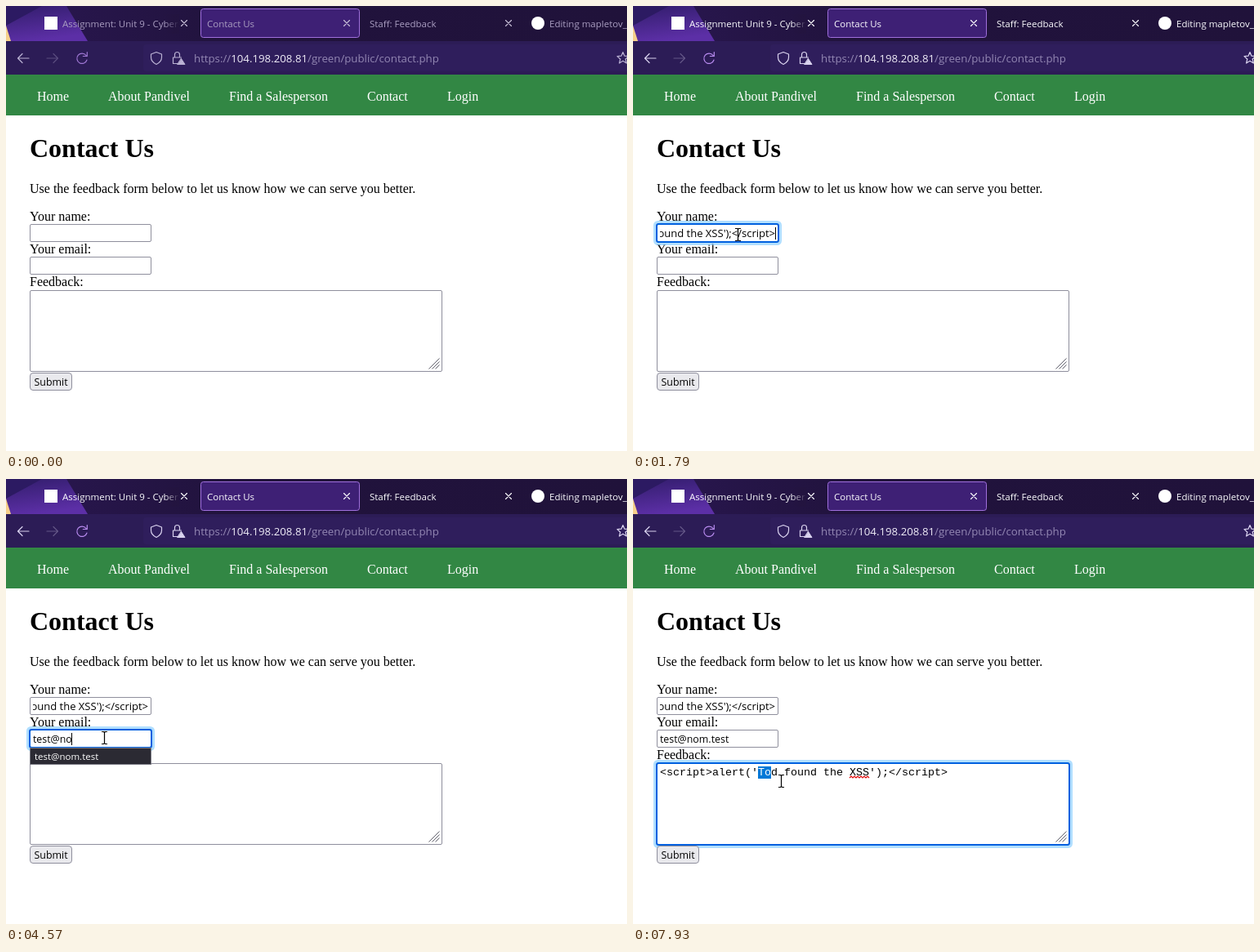
Write an HTML page that moves like this. It is 760 px wide and 545 px high and loops after 8000 ms.

```html
<!DOCTYPE html>
<html lang="en">
<head>
<meta charset="utf-8">
<title>Contact form</title>
<style>
  html, body { margin: 0; width: 100%; height: 100%; overflow: hidden; background: #fff; }
  svg { display: block; width: 760px; height: 545px; }
  text { white-space: pre; }
  .ui { font: 11.5px "Open Sans", "Noto Sans", sans-serif; }
  .url { font: 13.25px "Open Sans", "Noto Sans", sans-serif; }
  .field { font: 12.4px "Open Sans", "Noto Sans", sans-serif; }
  .markup { font-size: 13px; }
  .page { font: 16px "Liberation Serif", "Times New Roman", serif; }
  .title { font: bold 32px "Liberation Serif", "Times New Roman", serif; }
  .code { font: 13.333px "Liberation Mono", "Courier New", monospace; }
  .line { fill: none; stroke-linecap: round; stroke-linejoin: round; }
</style>
</head>
<body>
<svg id="stage" viewBox="0 0 760 545" xmlns="http://www.w3.org/2000/svg">
  <defs>
    <linearGradient id="strip">
      <stop offset="0" stop-color="#2a1752"/><stop offset=".35" stop-color="#21133d"/><stop offset="1" stop-color="#20123a"/>
    </linearGradient>
    <linearGradient id="art" x1="0" y1="0" x2=".3" y2="1">
      <stop offset="0" stop-color="#321d6c"/><stop offset="1" stop-color="#5c2fa6"/>
    </linearGradient>
    <linearGradient id="fade">
      <stop offset="0" stop-color="#23143f" stop-opacity="0"/><stop offset="1" stop-color="#23143f"/>
    </linearGradient>
    <clipPath id="tabClip"><rect x="40" y="0" width="171" height="43"/></clipPath>
    <clipPath id="nameClip"><rect x="33" y="268" width="142" height="20"/></clipPath>
  </defs>

  <rect width="760" height="545" fill="#fff"/>

  <!-- tab strip -->
  <rect width="760" height="43" fill="url(#strip)"/>
  <path d="M0 0H74L100 43H0Z" fill="url(#art)"/>
  <path d="M0 0H44L0 24Z" fill="#2c1a62"/>
  <path d="M0 24L6 43H0Z" fill="#f6cf8a"/>
  <rect x="238.5" y="3.5" width="194" height="35" rx="3" fill="#3e2075" stroke="#a070dd"/>
  <rect x="47" y="13" width="16" height="16" fill="#fff"/>
  <circle cx="651" cy="21" r="8" fill="#fff"/>
  <g id="tabs" class="ui">
    <text x="69" y="26" clip-path="url(#tabClip)">Assignment: Unit 9 - Cyber</text>
    <text x="246" y="26">Contact Us</text>
    <text x="445" y="26">Staff: Feedback</text>
    <text x="665" y="26">Editing mapletov_</text>
  </g>
  <rect x="194" y="10" width="18" height="24" fill="url(#fade)"/>
  <path id="closers" class="line" stroke-width="1.1"
    d="M214.500 17.500l7 7m0-7l-7 7M413.500 17.500l7 7m0-7l-7 7M611.500 17.500l7 7m0-7l-7 7"/>

  <!-- toolbar -->
  <rect y="43" width="760" height="41" fill="#2c1c56"/>
  <rect x="168" y="47" width="600" height="33" rx="4" fill="#2f1e5c"/>
  <g id="tools" class="line" stroke="#d9d2ee" stroke-width="1.2">
    <path d="M28 64H15M20 58.500L14.500 64L20 69.500"/>
    <path d="M50 64H63M58 58.500L63.500 64L58 69.500" opacity=".32"/>
    <path d="M98 60.500A6.200 6.200 0 1 0 99 66M99.300 56.500V61.500H94.300" stroke="#b98cf0"/>
    <path d="M184 56.500L190.500 59V63C190.500 67 188 69.500 184 71.500C180 69.500 177.500 67 177.500 63V59Z"/>
    <path d="M210 70.500H204.500V63H214.500M206.500 63V59.500A3 3 0 0 1 212.500 59.500V63"/>
    <path d="M214.500 64.500L219 71.500H210Z" fill="#d9d2ee" stroke-width="1"/>
    <path d="M755 56.500L757 61.200L762 61.600L758.200 65L759.400 70L755 67.300L750.600 70L751.800 65L748 61.600L753 61.200Z"/>
  </g>
  <text class="url" x="230" y="69" fill="#9387b3">https://<tspan fill="#f0edf8">104.198.208.81</tspan>/green/public/contact.php</text>

  <!-- page -->
  <rect y="84" width="760" height="50" fill="#328744"/>
  <g class="page" fill="#fff">
    <text x="38" y="116">Home</text>
    <text x="125" y="116">About Pandivel</text>
    <text x="273" y="116">Find a Salesperson</text>
    <text x="442" y="116">Contact</text>
    <text x="540" y="116">Login</text>
  </g>
  <text class="title" x="29" y="185">Contact Us</text>
  <g class="page">
    <text x="29" y="229">Use the feedback form below to let us know how we can serve you better.</text>
    <text x="29" y="263">Your name:</text>
    <text x="29" y="303">Your email:</text>
    <text x="29" y="343">Feedback:</text>
  </g>
  <g id="fields"></g>
  <path d="M517.500 444.500L530.500 431.500M521.500 444.500L530.500 435.500M525.500 444.500L530.500 439.500" stroke="#5f5f6b" fill="none"/>
  <rect x="29.500" y="449.500" width="51" height="21" rx="3.500" fill="#e9e9ed" stroke="#8f8f9d"/>
  <text class="field" x="34.500" y="465">Submit</text>

  <g clip-path="url(#nameClip)"><text id="nameText" class="field markup" x="174" y="283" text-anchor="end"></text></g>
  <text id="emailText" class="field" x="33" y="323"></text>
  <text id="codeText" class="code" x="33" y="363"></text>
  <path id="squiggle" fill="none" stroke="#e00000" stroke-width="1.2"/>
  <rect id="selection" x="153" y="352" height="15" fill="#0078d7"/>
  <text id="selectedText" class="code" x="153" y="363" fill="#fff"></text>
  <rect id="caret" width="1" height="15"/>

  <g id="popups"></g>

  <circle id="click" r="12" fill="#ffe02e" opacity=".85"/>
  <g id="cursor">
    <g id="beam" fill="none">
      <path d="M-3.500 -7.500H-1L0 -6.500L1 -7.500H3.500M0 -6.500V6.500M-3.500 7.500H-1L0 6.500L1 7.500H3.500" stroke="#000" stroke-width="1.200"/>
    </g>
    <path id="arrow" d="M0 0V16.500L3.800 13L6.300 18.800L8.700 17.800L6.200 12.200H11.500Z" fill="#fff" stroke="#000"/>
  </g>
</svg>

<script>
const LOOP = 8000;
const PAYLOAD = "<script>alert('Tod found the XSS');<\/script>";
const EMAIL = "test@nom.test";
const KEY_TIMES = [2780, 2840, 2970, 3240, 4170, 4430, 4570, 4760, 4890, 5020, 5160, 5220, 5290];

// time, x, y of the pointer
const POINTER = [
  [190, 690, 530], [320, 500, 425], [450, 320, 340], [590, 172, 288], [720, 128, 280],
  [1920, 128, 280], [2050, 125, 300], [2180, 120, 317], [6610, 120, 317], [6740, 126, 325],
  [6880, 144, 348], [7010, 157, 367], [7070, 157, 367], [7400, 158, 376], [7470, 158, 393],
  [7600, 159, 372], [7730, 159, 355], [7860, 169, 362], [7930, 181, 370]
];
const FIELDS = {
  name: { x: 29, y: 267, w: 149, h: 22 },
  email: { x: 29, y: 307, w: 149, h: 22 },
  feedback: { x: 29, y: 348, w: 505, h: 100 }
};

const $ = id => document.getElementById(id);
const set = (node, attrs) => { for (const k in attrs) node.setAttribute(k, attrs[k]); };
const show = (node, on) => { node.style.display = on ? "" : "none"; };
const within = (t, from, to) => t >= from && t < to;

function add(parent, tag, attrs, text) {
  const node = document.createElementNS("http://www.w3.org/2000/svg", tag);
  set(node, attrs);
  if (text) node.textContent = text;
  return parent.appendChild(node);
}

for (const f of Object.values(FIELDS)) {
  f.box = add($("fields"), "rect", { x: f.x + .5, y: f.y + .5, width: f.w - 1, height: f.h - 1, rx: 1.5, fill: "#fff" });
}
for (const f of Object.values(FIELDS)) {
  f.ring = add($("fields"), "g", { fill: "none" });
  add(f.ring, "rect", { x: f.x - 2.5, y: f.y - 2.5, width: f.w + 5, height: f.h + 5, rx: 4, stroke: "#8fd0ff", "stroke-width": 3, opacity: .7 });
  add(f.ring, "rect", { x: f.x, y: f.y, width: f.w, height: f.h, rx: 2, stroke: "#0060df", "stroke-width": 2 });
}

function makePopup(y, rows) {
  const group = add($("popups"), "g", { class: "ui", fill: "#fff" });
  add(group, "rect", { x: 29.5, y: y + .5, width: 148, height: rows.length * 20, fill: "#2b2a33", stroke: "#7c7c85" });
  rows.forEach((row, i) => add(group, "text", { x: 35, y: y + 15 + i * 20 }, row));
  return group;
}
const shortPayload = PAYLOAD.slice(0, 23) + "...";
const namePopup = makePopup(289, ["' OR 1=1 --'", shortPayload, "\" OR 1=1 #", "\" OR 1=1 ;--", shortPayload]);
const emailPopup = makePopup(329, ["test@wum.test", EMAIL]);
const matchPopup = makePopup(329, [EMAIL]);

let wave = "M265 366";
for (let i = 0; i < 12; i++) wave += `l2 ${i % 2 ? 2 : -2}`;
set($("squiggle"), { d: wave });

function pointerAt(t) {
  const i = POINTER.findIndex(p => p[0] > t);
  if (i < 0) return POINTER[POINTER.length - 1].slice(1);
  if (i === 0) return POINTER[0].slice(1);
  const [t0, x0, y0] = POINTER[i - 1], [t1, x1, y1] = POINTER[i];
  const k = (t - t0) / (t1 - t0);
  return [x0 + (x1 - x0) * k, y0 + (y1 - y0) * k];
}

const inside = (f, x, y) => x >= f.x && x <= f.x + f.w && y >= f.y && y <= f.y + f.h;

function focusedField(t) {
  if (t < 1060) return null;
  if (t < 2180) return "name";
  return t < 5550 ? "email" : "feedback";
}

function drawCaret(t, focus) {
  let x = 33, y = 271, on = t >= 1060;
  if (focus === "name") {
    if (t >= 1650) x = 174;
  } else if (focus === "email") {
    x = 33 + Math.floor($("emailText").getComputedTextLength());
    y = 311;
    on = !within(t, 3310, 3900) && t < 5490;
  } else if (focus === "feedback") {
    x = t < 6280 ? 33 : t < 7400 ? 385 : 153;
    y = 352;
    on = !within(t, 6080, 6280) && !within(t, 6840, 7370) && t < 7800;
  }
  set($("caret"), { x, y });
  show($("caret"), on);
}

function render(t) {
  const active = t >= 1060;
  set($("tabs"), { fill: active ? "#fbfbfe" : "#a99dc0" });
  set($("closers"), { stroke: active ? "#fbfbfe" : "#c9c0d8" });
  set($("tools"), { opacity: active ? 1 : .82 });

  const [x, y] = pointerAt(t);
  const focus = focusedField(t);
  for (const [key, f] of Object.entries(FIELDS)) {
    show(f.ring, key === focus);
    set(f.box, { stroke: t >= 190 && inside(f, x, y) ? "#676774" : "#8f8f9d" });
  }

  $("nameText").textContent = t >= 1650 ? PAYLOAD : "";
  $("emailText").textContent = EMAIL.slice(0, KEY_TIMES.filter(k => k <= t).length);
  $("codeText").textContent = t >= 6280 ? PAYLOAD : "";
  show($("squiggle"), t >= 6280);

  const selected = t < 7800 ? 0 : t < 7930 ? 1 : 2;
  set($("selection"), { width: selected * 8 });
  $("selectedText").textContent = PAYLOAD.slice(15, 15 + selected);
  drawCaret(t, focus);

  show(namePopup, within(t, 1120, 1790));
  set(namePopup, { opacity: t < 1720 ? 1 : .5 });
  show(emailPopup, within(t, 2780, 4430));
  show(matchPopup, within(t, 4430, 5490));

  set($("click"), { cx: x - 2, cy: y });
  show($("click"), within(t, 1060, 1190) || within(t, 2180, 2320));
  const onText = t >= 720 || Object.values(FIELDS).some(f => inside(f, x, y));
  show($("cursor"), t >= 190);
  show($("beam"), onText);
  show($("arrow"), !onText);
  set($("cursor"), { transform: `translate(${Math.round(x) + .5} ${Math.round(y)})` });
}

const start = performance.now();
function tick() {
  render((performance.now() - start) % LOOP);
  requestAnimationFrame(tick);
}
tick();
</script>
</body>
</html>
```
